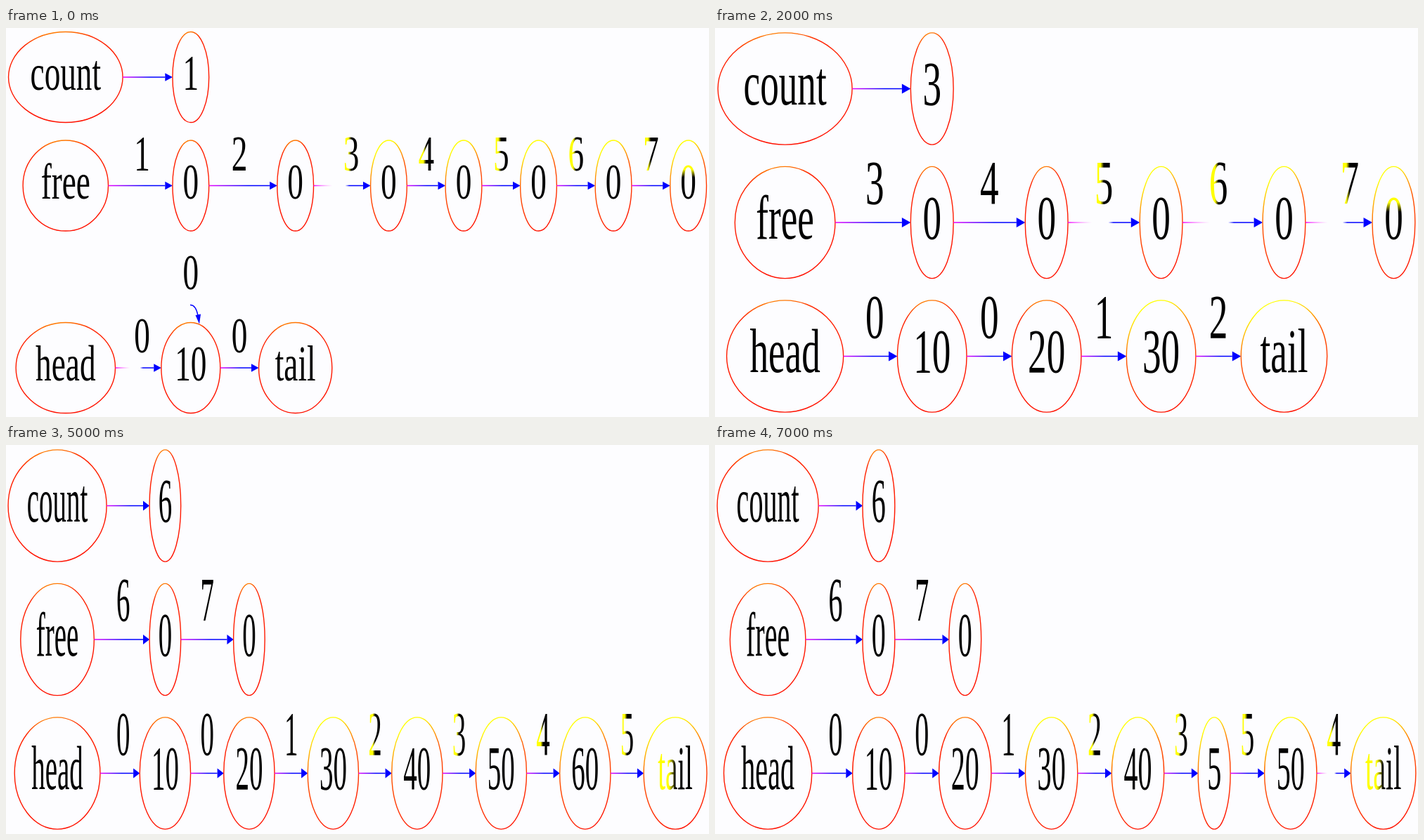
Recreate the animation shown at these times as an HTML page. Size 1000 px wide and 554 px high, loop 8 s.

```html
<!DOCTYPE html>
<html lang="en">
<head>
<meta charset="utf-8">
<title>Linked list in an array</title>
<style>
  html, body { margin: 0; width: 100%; height: 100%; overflow: hidden; background: #fdfdff; }
  svg { display: block; width: 100%; height: 100%; }
  text { font-family: "Liberation Serif", "Times New Roman", serif; text-anchor: middle; }
  ellipse { fill: none; stroke-width: 1.4; }
</style>
</head>
<body>
<svg id="stage" viewBox="0 0 1000 554" preserveAspectRatio="none">
  <defs>
    <linearGradient id="ring" x1="0.35" y1="0" x2="0.5" y2="1">
      <stop offset="0" stop-color="#f80"/><stop offset="0.12" stop-color="#f20"/>
      <stop offset="1" stop-color="#f10"/>
    </linearGradient>
    <linearGradient id="ringLit" x1="0.3" y1="0" x2="0.6" y2="1">
      <stop offset="0.08" stop-color="#ff0"/><stop offset="0.4" stop-color="#f50"/>
      <stop offset="1" stop-color="#f10"/>
    </linearGradient>
    <linearGradient id="wire">
      <stop offset="0" stop-color="#e0f"/><stop offset="0.65" stop-color="#00f"/>
    </linearGradient>
    <linearGradient id="wireGap">
      <stop offset="0" stop-color="#e0f"/>
      <stop offset="0.38" stop-color="#f6f" stop-opacity="0"/>
      <stop offset="0.64" stop-color="#00f" stop-opacity="0"/>
      <stop offset="0.72" stop-color="#00f"/>
    </linearGradient>
    <linearGradient id="inkLit">
      <stop offset="0.32" stop-color="#ff0"/><stop offset="0.5" stop-color="#000"/>
    </linearGradient>
    <linearGradient id="inkTop" x1="0" y1="0" x2="0" y2="1">
      <stop offset="0.28" stop-color="#ff0"/><stop offset="0.42" stop-color="#000"/>
    </linearGradient>
  </defs>
</svg>
<script>
const STEP = 1000;
const GAP = 62, EDGE = 4, ONE = 29.3, TWO = 47.5, COUNT = 92, FREE = 68.7, HEAD = 80, TAIL = 59;

// first: index of the first free cell; vals: list contents; refs: cell indices on the list's arrows
const five = { first: 5, vals: [10, 20, 30, 40, 50], refs: '000123'.slice(1) + '4', freeGaps: [2] };
five.refs = '001234';
const slides = [
  { first: 1, vals: [10], refs: '00', freeGaps: [2], headGaps: [0], short: true },
  { first: 2, vals: [10, 20], refs: '001', freeGaps: [2, 3, 4, 5] },
  { first: 3, vals: [10, 20, 30], refs: '0012', freeGaps: [2, 3, 4] },
  { first: 4, vals: [10, 20, 30, 40], refs: '00123', freeGaps: [2, 3] },
  five,
  { first: 6, vals: [10, 20, 30, 40, 50, 60], refs: '0012345' },
  five,
  { first: 6, vals: [10, 20, 30, 40, 5, 50], refs: '0012354', headGaps: [6] }
];

const stage = document.getElementById('stage');

function add(parent, tag, attrs, content) {
  const el = document.createElementNS('http://www.w3.org/2000/svg', tag);
  for (const key in attrs) el.setAttribute(key, attrs[key]);
  if (content !== undefined) el.textContent = content;
  parent.appendChild(el);
  return el;
}

function build({ first, vals, refs, freeGaps = [], headGaps = [], short }) {
  const g = add(stage, 'g', {});
  const n = vals.length, freeCount = 8 - first;
  const half = [];
  for (let i = 0; i < Math.max(freeCount, n + 1); i++)
    half.push(i === n ? TAIL : i < n && vals[i] > 9 ? TWO : ONE);

  // The whole graph is squeezed to the stage width and height
  const total = 2 * (EDGE + COUNT) + half.reduce((sum, h) => sum + 2 * h + GAP, 0);
  const kx = 1000 / total, ky = short ? 0.811 : 1;
  const rows = short ? [70, 224.5, 484] : [86.5, 277, 467.5];
  const x0 = (EDGE + COUNT) * kx;
  let right = EDGE + 2 * COUNT;
  const cols = half.map(h => {
    const x = right + GAP + h;
    right = x + h;
    return x * kx;
  });

  const write = (str, x, y, fill = '#000') => add(g, 'text', {
    transform: `translate(${x} ${y}) scale(${0.582 * kx} ${ky})`, 'font-size': 88, fill
  }, str);

  function node(str, x, y, r, lit) {
    add(g, 'ellipse', {
      cx: x, cy: y, rx: r * kx, ry: 79.6 * ky, stroke: `url(#${lit ? 'ringLit' : 'ring'})`
    });
    const ink = x < 900 ? '#000' : str === 'tail' ? 'url(#inkLit)' : 'url(#inkTop)';
    write(str, x, y + 22.5 * ky, ink);
  }

  function arrow(from, to, y, gap) {
    const neck = to - 12 * kx, h = 7 * ky;
    add(g, 'rect', {
      x: from, y: y - 0.75, width: neck - from, height: 1.5,
      fill: `url(#${gap ? 'wireGap' : 'wire'})`
    });
    add(g, 'path', { d: `M${neck} ${y - h}L${to} ${y}L${neck} ${y + h}Z`, fill: '#00f' });
  }

  function chain(name, r, y, items, labels, gaps, glow) {
    node(name, x0, y, r);
    let from = x0 + r * kx;
    items.forEach(([str, size], i) => {
      const x = cols[i], lx = x - (half[i] + GAP / 2) * kx;
      arrow(from, x - size * kx, y, gaps.includes(i));
      if (labels) write(labels[i], lx, y - 27 * ky, glow && lx > 480 ? 'url(#inkLit)' : '#000');
      node(str, x, y, size, labels && i > 1);
      from = x + size * kx;
    });
  }

  const list = vals.map(v => [v, v > 9 ? TWO : ONE]);
  list.push(['tail', TAIL]);
  const free = Array(freeCount).fill(['0', ONE]);

  chain('count', COUNT, rows[0], [[n, ONE]], null, []);
  chain('free', FREE, rows[1], free, '01234567'.slice(first), freeGaps, true);
  chain('head', HEAD, rows[2], list, refs, headGaps, n > 4);

  if (short) {
    write('0', cols[0], 372);
    add(g, 'path', {
      d: 'M262 394.5C268 394 271 400 273 409', fill: 'none', stroke: '#00f', 'stroke-width': 1.4
    });
    add(g, 'path', { d: 'M269.5 409L277 407.5L275 421.5Z', fill: '#00f' });
  }
  return g;
}

const groups = slides.map(build);
const start = performance.now();

function show() {
  const now = Math.max(0, performance.now() - start);
  const index = Math.floor(now / STEP) % groups.length;
  groups.forEach((g, i) => { g.style.display = i === index ? '' : 'none'; });
  requestAnimationFrame(show);
}
show();
</script>
</body>
</html>
```
